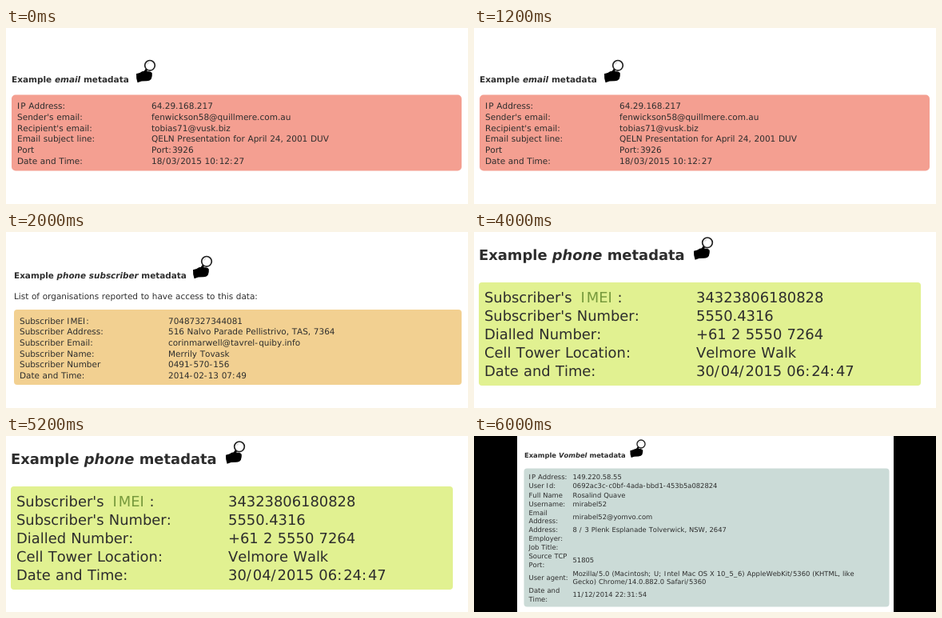
These frames come from a looping animation (578x220 px, 8 s). An HTML page:

```html
<!DOCTYPE html>
<html lang="en">
<head>
<meta charset="utf-8">
<title>Metadata examples</title>
<style>
html, body { margin: 0; width: 100%; height: 100%; overflow: hidden; background: #fff; }
svg { display: block; width: 578px; height: 220px; }
text {
  font-family: Verdana, "DejaVu Sans", sans-serif; fill: #2d2d2d; white-space: pre;
  word-spacing: .034em; font-kerning: none; text-rendering: geometricPrecision;
}
.head { font-weight: bold; word-spacing: 0; }
.head tspan { font-style: italic; }
.wide { letter-spacing: .11em; }
.link { fill: #76993c; }
</style>
</head>
<body>
<svg id="stage" viewBox="0 0 578 220">
  <defs>
    <g id="lens">
      <path d="M-17 10.4L-12.6 9.2Q-9.5 6.8-5.5 7.1L-1 7.4Q2 7.8 2.8 9.8Q3.2 13 1.8 16.6Q.4 19-4 19.4L-10.4 19.8L-15.4 21.4Q-17.4 16-17 10.4Z"/>
      <path d="M-4.2 5.2L-7.4 10" stroke="#000" stroke-width="3" stroke-linecap="round"/>
      <circle r="6.3" fill="#fff" stroke="#222" stroke-width="1.7"/>
      <path d="M-3.6-1.2A3.8 3.8 0 0 1-.6-3.8" fill="none" stroke="#bbb" stroke-width=".8"/>
    </g>
  </defs>
</svg>
<script>
const STEP = 2000;
const stage = document.getElementById('stage');

// box: x, y, width, height; lens: x, y, scale; rows: label, value
const scenes = [
  {
    size: 10.5, color: '#f49f91', box: [7, 83.5, 563, 95], radius: 5,
    head: [7, 67.8, 'email'], lens: [180, 46.8, 1],
    cols: [14, 182], top: 101.3, pitch: 13.7,
    rows: [
      ['IP Address:', '64.29.168.217'],
      ["Sender's email:", 'fenwickson58@quillmere.com.au'],
      ["Recipient's email:", 'tobias71@vusk.biz'],
      ['Email subject line:', 'QELN Presentation for April 24, 2001 DUV'],
      ['Port', 'Port:3926'],
      ['Date and Time:', '18/03/2015 10:12:27']
    ]
  },
  {
    size: 10.45, color: '#f2d091', box: [10, 97, 560, 94], radius: 4,
    head: [10, 57.8, 'phone subscriber'], lens: [251, 36.8, 1],
    notes: [[10, 84.2, 'List of organisations reported to have access to this data:']],
    cols: [17, 203], top: 114.6, pitch: 13.65,
    rows: [
      ['Subscriber IMEI:', '70487327344081'],
      ['Subscriber Address:', '516 Nalvo Parade Pellistrivo, TAS, 7364'],
      ['Subscriber Email:', 'corinmarwell@tavrel-quiby.info'],
      ['Subscriber Name:', 'Merrily Tovask'],
      ['Subscriber Number', '0491-570-156'],
      ['Date and Time:', '2014-02-13 07:49']
    ]
  },
  {
    size: 17.9, color: '#e1f191', box: [6, 63, 553, 129], radius: 4,
    head: [6, 35, 'phone'], lens: [292, 13.3, 1],
    notes: [[133.5, 88, 'IMEI', 'link'], [179.5, 88, ':']],
    cols: [13, 278], top: 88, pitch: 23,
    rows: [
      ["Subscriber's", '34323806180828'],
      ["Subscriber's Number:", '5550.4316'],
      ['Dialled Number:', '+61 2 5550 7264'],
      ['Cell Tower Location:', 'Velmore Walk'],
      ['Date and Time:', '30/04/2015 06:24:47']
    ]
  },
  {
    size: 8.4, color: '#cbdbd7', box: [62.5, 40.5, 457, 173], radius: 4,
    head: [63, 26.6, 'Vombel'], lens: [209, 10, .8], page: [54, 471],
    cols: [68.5, 123.5], top: 54.2, pitch: 11.2,
    rows: [
      ['IP Address:', '149.220.58.55'],
      ['User Id:', '0692ac3c-c0bf-4ada-bbd1-453b5a082824'],
      ['Full Name', 'Rosalind Quave'],
      ['Username:', 'mirabel52']
    ],
    notes: [
      [68.5, 99, 'Email'], [68.5, 109.3, 'Address:'], [123.5, 104, 'mirabel52@yomvo.com'],
      [68.5, 120.2, 'Address:'], [123.5, 120.2, '8 / 3 Plenk Esplanade Tolverwick, NSW, 2647'],
      [68.5, 131.2, 'Employer:'], [68.5, 142.2, 'Job Title:'],
      [68.5, 153.2, 'Source TCP'], [68.5, 163.6, 'Port:'], [123.5, 158.4, '51805'],
      [68.5, 180, 'User agent:'],
      [123.5, 174.8, 'Mozilla/5.0 (Macintosh; U; Intel Mac OS X 10_5_6) AppleWebKit/5360 (KHTML, like'],
      [123.5, 185.3, 'Gecko) Chrome/14.0.882.0 Safari/5360'],
      [68.5, 196.2, 'Date and'], [68.5, 206.8, 'Time:'], [123.5, 201.4, '11/12/2014 22:31:54']
    ]
  }
];

function add(parent, tag, attrs, content) {
  const el = document.createElementNS('http://www.w3.org/2000/svg', tag);
  for (const key in attrs) el.setAttribute(key, attrs[key]);
  if (content) el.textContent = content;
  return parent.appendChild(el);
}

function rect(parent, [x, y, width, height], fill, rx = 0) {
  add(parent, 'rect', { x, y, width, height, fill, rx });
}

// Narrow marks get extra room, as in wide screen fonts
function write(parent, x, y, label, cls = '') {
  const line = add(parent, 'text', { x, y, class: cls });
  label.split(/([\/:;_I-])/).forEach((part, i) => {
    if (i % 2) add(line, 'tspan', { class: 'wide' }, part);
    else line.append(part);
  });
}

function build(s) {
  const g = add(stage, 'g', { 'font-size': s.size });
  if (s.page) rect(g, [0, 0, 578, 220], '#000');
  const [left, width] = s.page || [0, 578];
  rect(g, [left, 0, width, 220], '#fff');
  rect(g, s.box, s.color, s.radius);

  const [x, y, topic] = s.head;
  const head = add(g, 'text', { x, y, class: 'head' });
  head.append('Example ');
  add(head, 'tspan', {}, topic);
  head.append(' metadata');

  const [lx, ly, scale] = s.lens;
  add(g, 'use', { href: '#lens', transform: `translate(${lx} ${ly}) scale(${scale})` });

  s.rows.forEach((row, i) => row.forEach((label, c) =>
    write(g, s.cols[c], s.top + i * s.pitch, label)));
  for (const note of s.notes || []) write(g, ...note);
  return g;
}

scenes.map(build).forEach((g, i) => {
  const frames = [0, 1, 2, 3, 4].map(k => ({ opacity: k % 4 === i ? 1 : 0, easing: 'step-end' }));
  g.animate(frames, { duration: 4 * STEP, iterations: Infinity }).startTime = 0;
});
</script>
</body>
</html>
```
